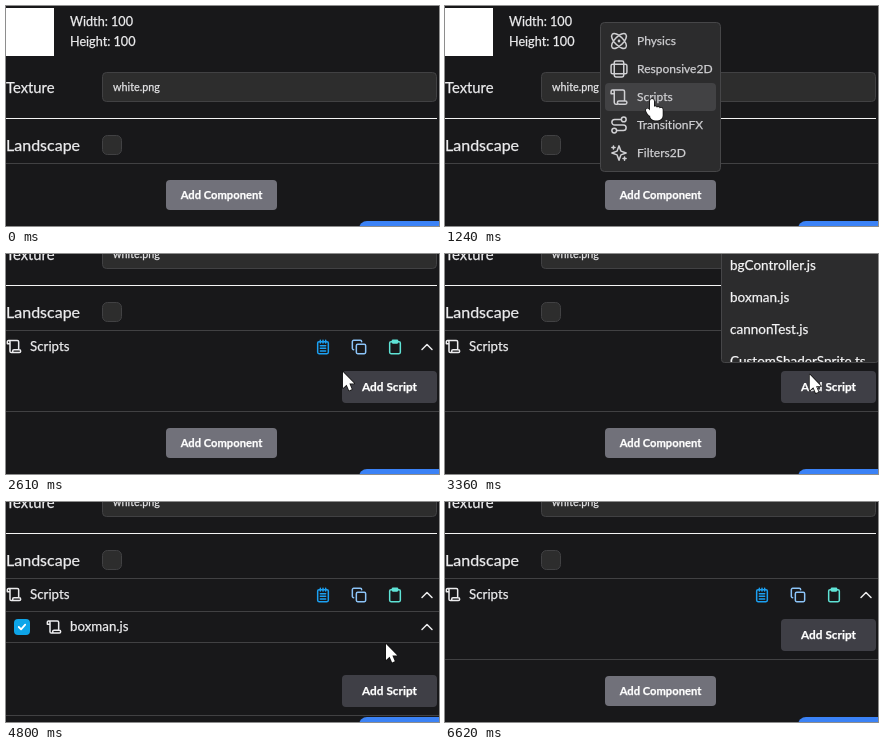
An HTML page with a canvas for the animation above (7160 ms loop, 433 by 220 pixels).

```html
<!DOCTYPE html>
<html lang="en">
<head>
<meta charset="utf-8">
<title>Adding a script component</title>
<style>
html, body { margin: 0; width: 100%; height: 100%; overflow: hidden; background: #18181a; }
canvas { display: block; width: 433px; height: 220px; }
</style>
</head>
<body>
<canvas id="stage"></canvas>
<script>
const W = 433, H = 220, LOOP = 7160;
const canvas = document.getElementById('stage');
const ctx = canvas.getContext('2d');
const dpr = window.devicePixelRatio || 1;
canvas.width = W * dpr;
canvas.height = H * dpr;

const BG = '#18181a', FIELD = '#2d2d2d', PANEL = '#2c2c2d', EDGE = '#414143';
const INK = '#ececee', SOFT = '#d0d0d3';

// Where the cursor rests, and when
const STOPS = [
  { from: 190, to: 190, x: 226, y: 228 },
  { from: 690, to: 970, x: 212, y: 187 },
  { from: 1240, to: 1400, x: 207, y: 93 },
  { from: 1790, to: 1860, x: 246, y: 98 },
  { from: 2470, to: 2470, x: 272, y: 106 },
  { from: 2610, to: 2680, x: 337, y: 118 },
  { from: 2820, to: 3290, x: 366, y: 123 },
  { from: 3970, to: 4230, x: 323, y: 44 },
  { from: 4730, to: 4730, x: 332, y: 157 },
  { from: 4800, to: 4870, x: 380, y: 142 },
  { from: 5010, to: 5210, x: 384, y: 127 },
  { from: 5280, to: 6200, x: 396, y: 127 },
  { from: 6620, to: 6620, x: 360, y: 226 }
];

const MENU = [['Physics', 'atom'], ['Responsive2D', 'frames'], ['Scripts', 'scroll'],
  ['TransitionFX', 'route'], ['Filters2D', 'sparkles']];
const FILES = ['bgController.js', 'boxman.js', 'cannonTest.js', 'CustomShaderSprite.ts'];

const clamp = v => Math.max(0, Math.min(1, v));
const ramp = (t, a, b) => clamp((t - a) / (b - a));
const smooth = v => v * v * (3 - 2 * v);
const mix = (a, b, k) => a + (b - a) * k;

function oval(p, x, y, rx, ry = rx, turn = 0) {
  p.moveTo(x + rx * Math.cos(turn), y + rx * Math.sin(turn));
  p.ellipse(x, y, rx, ry, turn, 0, 2 * Math.PI);
}

function lines(p, ...points) {
  points.forEach(([x, y], i) => i ? p.lineTo(x, y) : p.moveTo(x, y));
}

function plus(p, x, y) {
  lines(p, [x - 2, y], [x + 2, y]);
  lines(p, [x, y - 2], [x, y + 2]);
}

// Icons live on a 24 by 24 grid
const ICONS = {
  atom(p) {
    for (const side of [-1, 1]) oval(p, 12, 12, 12, 5.5, side * Math.PI / 4);
    oval(p, 12, 12, 0.8);
  },
  frames(p) {
    p.roundRect(6, 2, 12, 20, 2);
    p.roundRect(2, 6, 20, 12, 2);
  },
  scroll(p) {
    p.moveTo(4, 3);
    p.arcTo(19, 3, 19, 5, 2);
    p.lineTo(19, 17);
    p.roundRect(10, 17, 12, 4, 2);
    p.moveTo(10, 21);
    p.arcTo(6, 21, 6, 19, 2);
    p.lineTo(6, 5);
    p.arc(4, 5, 2, 0, Math.PI, true);
    lines(p, [2, 5], [2, 8], [6, 8]);
  },
  route(p) {
    const q = Math.PI / 2;
    oval(p, 6, 19, 3);
    oval(p, 18, 5, 3);
    p.moveTo(9, 19);
    p.arc(17.5, 15.5, 3.5, q, -q, true);
    p.arc(6.5, 8.5, 3.5, q, -q);
    p.lineTo(15, 5);
  },
  sparkles(p) {
    for (let i = 0; i < 8; i++) {
      const r = i % 2 ? 3.4 : 9, a = i * Math.PI / 4;
      p.lineTo(12 + r * Math.cos(a), 12 + r * Math.sin(a));
    }
    p.closePath();
    plus(p, 5, 5);
    plus(p, 19, 19);
  },
  notes(p) {
    p.roundRect(4, 4, 16, 18, 2);
    for (const i of [0, 1, 2]) {
      lines(p, [8 + 4 * i, 2], [8 + 4 * i, 6]);
      lines(p, [8, 10 + 4 * i], [16, 10 + 4 * i]);
    }
  },
  copy(p) {
    p.roundRect(8, 8, 14, 14, 2);
    p.moveTo(4, 16);
    p.arcTo(2, 16, 2, 14, 2);
    p.arcTo(2, 2, 4, 2, 2);
    p.arcTo(16, 2, 16, 4, 2);
  },
  paste(p) {
    p.roundRect(4, 4, 16, 18, 2);
    p.roundRect(8, 2, 8, 4, 1);
  },
  up: p => lines(p, [4, 16], [12, 8], [20, 16]),
  check: p => lines(p, [5, 12], [10, 17], [19, 7])
};

const CURSORS = {
  arrow(p) {
    lines(p, [0, 0], [0, 16], [3.6, 12.7], [6.1, 18.5], [8.8, 17.3], [6.4, 11.6], [11.3, 11.6]);
    p.closePath();
  },
  hand(p) {
    p.roundRect(-2, 0, 4, 15, 2);
    for (const i of [0, 1, 2]) p.roundRect(1.5 + 2.9 * i, 7.3 + 0.7 * i, 3.4, 8, 1.7);
    p.roundRect(-2, 11, 12.7, 10.5, [1, 1, 5, 5]);
    oval(p, -3, 13.3, 2, 4.2, -0.6);
  }
};

function buildPaths(set) {
  for (const name in set) {
    const path = new Path2D();
    set[name](path);
    set[name] = path;
  }
}
buildPaths(ICONS);
buildPaths(CURSORS);

let cursor = null, hot = false;

// Is the cursor over this box? Anything hovered turns it into a hand.
function over(x, y, w, h) {
  if (!cursor) return false;
  const cy = cursor.y - ctx.getTransform().f / dpr;
  const hit = cursor.x >= x && cursor.x < x + w && cy >= y && cy < y + h;
  hot = hot || hit;
  return hit;
}

function text(s, x, y, size, color = INK, weight = 400, align = 'left') {
  ctx.font = `${weight} ${size}px Lato, sans-serif`;
  ctx.letterSpacing = '0.01px'; // keeps ligatures off
  ctx.textAlign = align;
  ctx.fillStyle = ctx.strokeStyle = color;
  ctx.lineWidth = 0.25;
  ctx.fillText(s, x, y);
  ctx.strokeText(s, x, y);
}

function box(x, y, w, h, r, fill, edge) {
  const o = edge ? 0.5 : 0;
  ctx.beginPath();
  ctx.roundRect(x + o, y + o, w - 2 * o, h - 2 * o, r);
  ctx.fillStyle = fill;
  ctx.fill();
  if (edge) {
    ctx.strokeStyle = edge;
    ctx.lineWidth = 1;
    ctx.stroke();
  }
}

function rule(y, color = EDGE, w = W) {
  ctx.fillStyle = color;
  ctx.fillRect(0, y, w, 1);
}

function icon(name, cx, cy, size, color = INK, weight = 1.5) {
  const k = size / 24;
  ctx.save();
  ctx.translate(cx - size / 2, cy - size / 2);
  ctx.scale(k, k);
  ctx.lineWidth = weight / k;
  ctx.lineCap = ctx.lineJoin = 'round';
  ctx.strokeStyle = color;
  ctx.stroke(ICONS[name]);
  ctx.restore();
}

function button(label, x, y, w, h, fill, size) {
  over(x + 4, y + 4, w - 8, h - 8);
  box(x, y, w, h, 4, fill);
  text(label, x + w / 2, y + h / 2 + 4, size, '#fff', 700, 'center');
}

function moveCursor(t) {
  const i = STOPS.findIndex(s => s.from > t);
  if (i < 1) return null;
  const a = STOPS[i - 1], b = STOPS[i];
  const k = smooth(ramp(t, a.to, b.from));
  return { x: mix(a.x, b.x, k), y: mix(a.y, b.y, k) };
}

function drawInspector() {
  box(0, 2, 48, 48, 0, '#fff');
  text('Width: 100', 64, 20, 12.6);
  text('Height: 100', 64, 40, 12.6);
  text('Texture', 0, 87, 14.8);
  box(96, 66, 335, 30, 4, FIELD, EDGE);
  text('white.png', 107, 85, 10.8, '#e4e4e6');
  rule(112, '#f4f4f4', 431);
  text('Landscape', 0, 145, 16);
  box(96, 129, 20, 20, 5, FIELD, EDGE);
  rule(157);
}

function drawFileRow() {
  over(0, 190, W, 31);
  rule(190);
  box(8, 198, 16, 16, 4, '#0ea5e9');
  icon('check', 16, 206, 11, '#fff', 1.8);
  icon('scroll', 48, 206, 16);
  text('boxman.js', 64, 210, 13.3);
  icon('up', 421, 206, 15);
  rule(221);
}

function drawScripts(shift) {
  icon('scroll', 8, 173.5, 16);
  text('Scripts', 24, 178, 13.3);
  icon('notes', 317, 174, 16, '#1ba0f2');
  icon('copy', 353, 174, 16, '#8cc4f8');
  icon('paste', 389, 174, 16, '#5fe3d6');
  icon('up', 421, 174, 15);
  if (shift) drawFileRow();
  button('Add Script', 336, 198 + shift, 95, 32, '#3f3f46', 11.8);
  rule(238 + shift);
}

function drawMenu(alpha) {
  ctx.globalAlpha = alpha;
  box(155, 16, 121, 150, 4, PANEL, '#464648');
  MENU.forEach(([label, glyph], i) => {
    const top = 21 + 28 * i;
    if (over(160, top, 111, 28)) box(160, top, 111, 28, 4, '#424244');
    icon(glyph, 174, top + 14, 19, SOFT);
    text(label, 192, top + 18, 12, SOFT);
  });
  ctx.globalAlpha = 1;
}

function drawFiles(alpha) {
  ctx.save();
  ctx.globalAlpha = alpha;
  box(276, -20, 158, 129, 3, PANEL, '#464648');
  ctx.beginPath();
  ctx.rect(277, 0, 156, 108);
  ctx.clip();
  FILES.forEach((label, i) => {
    const top = 32 * i - 4;
    if (over(277, top, 156, Math.min(32, 108 - top))) box(277, top, 157, 32, 4, '#71717a');
    text(label, 285, top + 19.5, 13.5, '#f4f4f5');
  });
  ctx.restore();
}

function drawCursor() {
  const shape = hot ? CURSORS.hand : CURSORS.arrow;
  ctx.save();
  ctx.translate(cursor.x, cursor.y);
  ctx.lineJoin = 'round';
  ctx.lineWidth = 1.5;
  ctx.strokeStyle = '#111';
  ctx.stroke(shape);
  ctx.fillStyle = '#fff';
  ctx.fill(shape);
  ctx.restore();
}

function draw(t) {
  ctx.setTransform(dpr, 0, 0, dpr, 0, 0);
  ctx.fillStyle = BG;
  ctx.fillRect(0, 0, W, H);
  cursor = moveCursor(t);
  hot = false;

  const added = t >= 1400;
  const fileShift = t >= 4320 && t < 5880 ? 56 : 0;
  const scroll = Math.round(81 * smooth(ramp(t, 1860, 2330)));

  ctx.save();
  ctx.translate(0, -scroll);
  drawInspector();
  if (added) drawScripts(fileShift);
  button('Add Component', 160, 174 + (added ? 81 : 0) + fileShift, 111, 30, '#71717a', 11.2);
  ctx.restore();

  box(353, 215, 90, 30, 8, '#3b82f6');

  const menu = ramp(t, 720, 860) * (1 - ramp(t, 1380, 1450));
  if (menu) drawMenu(menu);
  const files = ramp(t, 2820, 2960) * (1 - ramp(t, 4230, 4330));
  if (files) drawFiles(files);
  if (cursor) drawCursor();
}

const start = performance.now();
function tick() {
  draw((performance.now() - start) % LOOP);
  requestAnimationFrame(tick);
}
tick();
</script>
</body>
</html>
```
